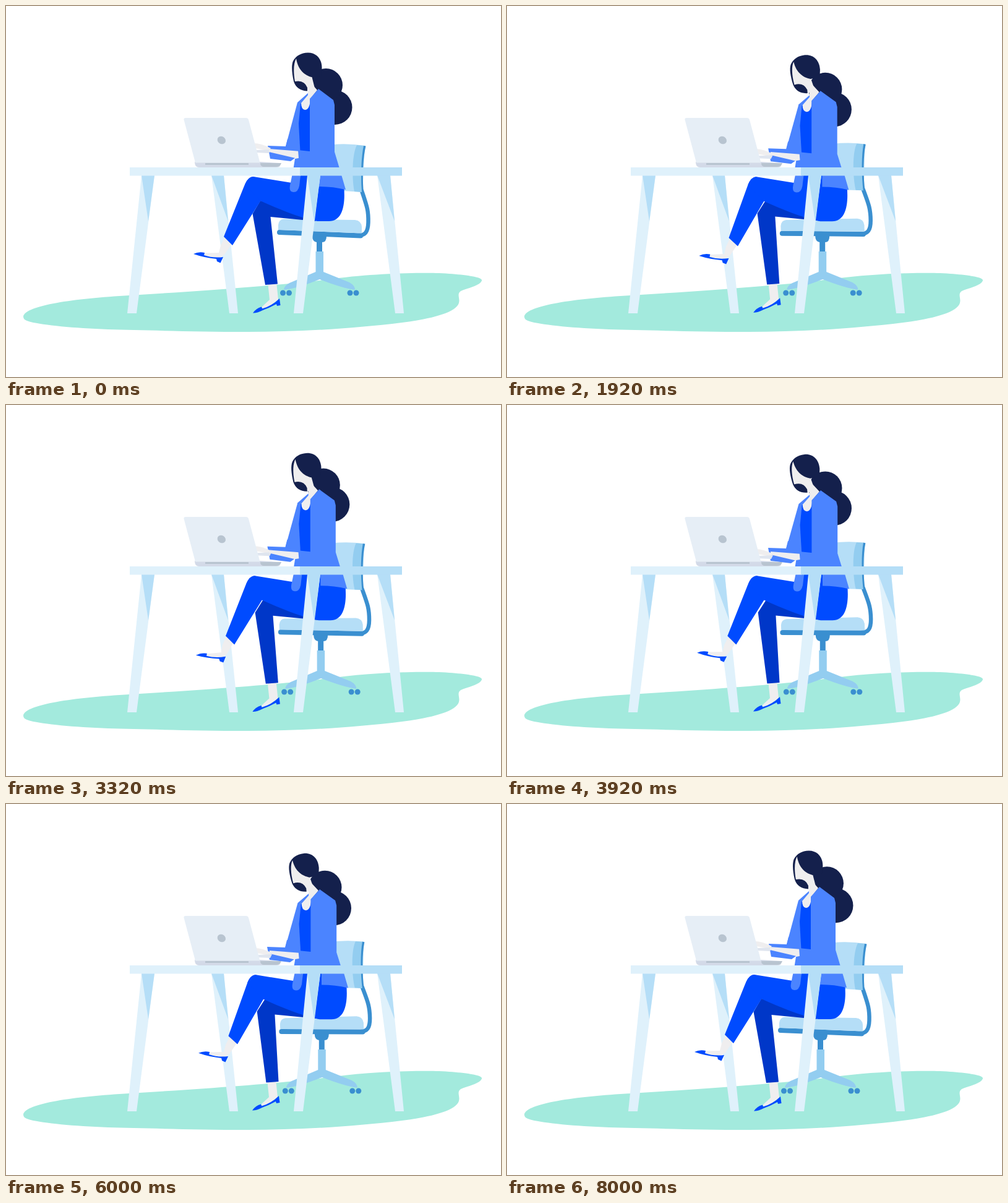
Write an HTML page that moves like this. It is 800 px wide and 600 px high and loops after 8040 ms.

```html
<!DOCTYPE html>
<html lang="en">
<head>
<meta charset="utf-8">
<title>Woman typing at a desk</title>
<style>
html, body { margin: 0; width: 100%; height: 100%; overflow: hidden; background: #fff; }
svg { display: block; width: 100vw; height: 100vh; }
.pale { fill: #dff1fb; }
.sky { fill: #b5def7; }
.mid { fill: #93cdf0; }
.steel { fill: #3a8fd0; }
.rod { fill: none; stroke: #3a8fd0; stroke-linecap: round; }
.blue { fill: #004bff; }
.navy { fill: #0037c8; }
.coat { fill: #4b84ff; }
.hair { fill: #14204c; }
.skin { fill: #efeeef; }
</style>
</head>
<body>
<svg viewBox="0 0 800 600">
  <path fill="#a3eadd" d="M28 502C32 484 110 473 200 468C330 460 450 451 530 441C590 433 660 431 700 432C740 434 770 438 769 444C767 452 744 457 735 461C728 466 734 472 732 480C728 497 680 507 640 512C560 522 470 527 390 527C300 527 220 524 165 523C110 521 60 516 40 511C32 509 28 507 28 502Z"/>

  <g id="base">
    <path class="mid" d="M500.500 397H513V430L555 447Q564 452 564 459Q543 456 507 442Q470 457 449 459Q450 452 458 448L500.500 430Z"/>
    <path class="steel" d="M495 372H518Q518 382 511 382V397H502V382Q495 381 495 372Z"/>
    <g class="steel">
      <circle cx="447.500" cy="464" r="4.500"/><circle cx="457.500" cy="464" r="4.500"/>
      <circle cx="556" cy="464" r="4.500"/><circle cx="566" cy="464" r="4.500"/>
    </g>
  </g>
  <g id="chair">
    <path class="rod" stroke-width="6.500" d="M575 299C583 323 586 330 585.500 350C585 366 580 371 570 371"/>
    <path class="rod" stroke-width="8" d="M442 366L573 371.500"/>
    <path class="sky" d="M440 362V354Q441 345 449 344.500L564 346Q574 347 575 357V367.500Z"/>
    <path class="sky" d="M528 224Q555 222 580 226L576 301L528 298Z"/>
    <path class="mid" d="M567 225L580 226C574 250 574 280 576 301L563 300C559 280 559 240 567 225Z"/>
    <path class="steel" d="M578 226L581.500 226.500C576 250 576 280 578 302L575 301C573 275 574 245 578 226Z"/>
  </g>

  <path class="pale" d="M219 274H240L211 497H196ZM332 274H352L375 497H361ZM600 274H621L643 497H629Z"/>
  <path class="sky" d="M219 274H240L230 348ZM332 274H352L359 348ZM600 274H621L628 348Z"/>

  <g id="plantedFoot">
    <path class="skin" d="M423 446H437L440 475L418 491L413 487L426 475Z"/>
    <path class="blue" d="M399 496.500Q404 489 413 486.500L414 489.500Q430 485 442 473L443.500 484L438 485L437 482Q426 488 415 492Q405 497 399 496.500Z"/>
  </g>
  <path id="backLeg" class="navy" d="M411 315L398.500 336L419 451L439 449.500L427.500 341L500 348V325Z"/>
  <g id="frontLeg">
    <g id="calf">
      <g id="kickFoot">
        <path class="skin" d="M354 373L366 383L353 402Q345 409 333 407L319 404L321 399.500L344 399L347 387Z"/>
        <path class="blue" d="M303 401Q311 397 321 399L320 403Q334 408 351 406L346.500 415.500L341 413L340 409Q320 407 303 401Z"/>
      </g>
      <path class="blue" d="M352 373L385 291Q391 276 400 276L420 290L411.500 315L366 387Z"/>
    </g>
    <path class="blue" d="M400 276L462 286L474 264H506L546 290C549 322 544 348 522 348H503C475 343 440 328 411 315L386 289Q391 276 400 276Z"/>
  </g>
  <g id="coatTail" class="coat">
    <path d="M464 266L459 290Q457 301 465 301Q472 301 474 291L477 266Z"/>
    <path d="M506 266H540L549 297Q528 292 506 292Z"/>
  </g>

  <circle id="lowBun" class="hair" cx="531.500" cy="164" r="28"/>
  <circle id="midBun" class="hair" cx="517" cy="128" r="27"/>

  <path id="farSleeve" class="coat" d="M455 215L452 227L423 226L427 247L460 251L467 246L477 242V215Z"/>
  <g id="torso">
    <path class="coat" d="M489 140L471 156L452 227L477 240Z"/>
    <path class="blue" d="M476 158L492 150V262H477L473 190Z"/>
    <path class="skin" d="M487 118L503 136L492 150Q491 168 483 168Q477 167 477 157L488 144Z"/>
  </g>
  <g id="hands">
    <path class="skin" d="M401 222Q412 222 428 230L424 234L403 230Z"/>
    <path fill="#dfe5ef" d="M404 233L428 232L425 238L404 237Z"/>
  </g>
  <path id="forearm" class="skin" d="M425 231L476 235V248L425 236Z"/>
  <path id="coat" class="coat" d="M505 134L529 152L531 160V236L540 266H464L467 247L473 246L472 233L491 235V150Z"/>

  <g id="head">
    <path class="skin" d="M469 84L464 100L467 122Q473 134 487 137L500 137L494 113Z"/>
    <path class="hair" d="M488 75.500C502 75.500 511 86 510.500 101L509 113L494 115C483 112 472 104 469 85C465 92 464 105 467 122Q482 119 487 132V137.500Q470 137 465 122C462 108 461 96 464 89Q471 76 488 75.500Z"/>
  </g>

  <path class="pale" d="M487 274H508L480 497H465ZM200 261H476V274.500H200Z"/>
  <path class="sky" d="M487 274H508L498 348ZM475 261H640V274.500H475Z"/>

  <path fill="#d3dae8" d="M305 252H410L442 254Q446 261 436 261H312Q305 261 305 252Z"/>
  <path fill="#e6eef6" d="M290 181H388Q391 181 392 184L410.500 253.500H306L287.500 184Q287 181 290 181Z"/>
  <path fill="#b8c4d0" d="M322 254H392V257H322ZM411 254H445Q443 260 437 260H417Q411 260 411 254Z"/>
  <ellipse fill="#b8c4d0" cx="348.300" cy="217" rx="7" ry="6" transform="rotate(35 348.300 217)"/>
</svg>
<script>
const LOOP = 8040, STEP = 40, SHIFT = 840, LAG = 300;

// Eased step from 0 to 1 that takes SHIFT ms.
function ramp(t, start) {
  const u = Math.min(1, Math.max(0, (t - start) / SHIFT));
  return u * u * (3 - 2 * u);
}

// 0 is sitting back, 1 is leaning in; she eases off briefly in between.
const leanAt = t => ramp(t, 0) - .8 * (ramp(t, 1680) - ramp(t, 2920)) - ramp(t, 6960);
const wave = (t, period) => Math.sin(2 * Math.PI * t / period);
const pulse = (t, period) => wave(t, 2 * period) ** 2;

const set = (id, value) => document.getElementById(id).setAttribute('transform', value);
const move = (x, y) => `translate(${x} ${y})`;
const turn = (angle, x, y) => `rotate(${angle} ${x} ${y})`;

function draw(t) {
  const lean = leanAt(t);
  const trail = leanAt(t - LAG); // head and hair follow late
  const sway = wave(t, 2000);
  const by = (x, y) => move(x * lean, y * lean);

  set('base', by(3.8, 0));
  set('chair', turn(-2.2 * lean, 495, 280));
  set('plantedFoot', by(-1, -1));
  // The planted leg tilts at the ankle while the knee follows the body.
  set('backLeg', by(24, -.5) + `matrix(1 0 ${-.05 * lean} 1 0 0)`);
  set('frontLeg', by(4, .3));
  set('calf', turn(-2.3 * pulse(t, 800), 400, 288));
  set('kickFoot', turn(2.5 * lean + 5.5 * sway, 355, 390));
  set('coatTail', by(4, .6));

  // The chest widens slightly as the back shoulder turns away.
  const chest = by(-20.7, 4) + `scale(${1 + .045 * lean} 1)`;
  set('torso', chest);
  set('coat', chest);
  set('farSleeve', by(-1, 5));
  set('forearm', by(1, 6));
  set('hands', by(2, 11));

  set('head', by(0, 4) + turn(-4.5 * trail - 1.5 * pulse(t, 1600), 489, 152));
  const drift = 4.5 * sway - 1.5 * trail;
  set('midBun', move(drift, 6.8 * trail));
  set('lowBun', move(drift, 4.5 * trail + 5 * sway));
}

const start = performance.now();
function frame() {
  const t = (performance.now() - start) % LOOP;
  draw(Math.floor(t / STEP) * STEP);
  requestAnimationFrame(frame);
}
frame();
</script>
</body>
</html>
```
